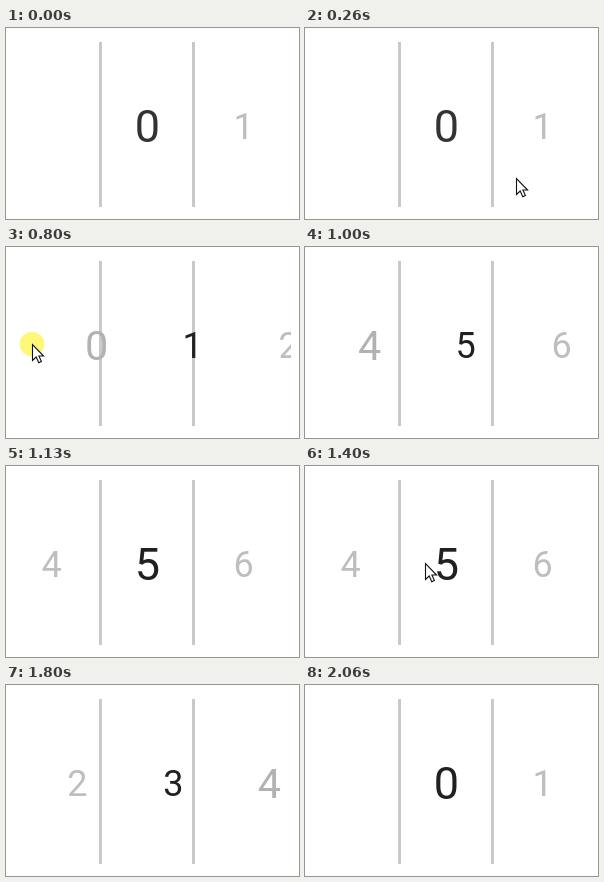
Recreate the animation shown at these times as an HTML page. Size 293x191 px, loop 2790 ms.

```html
<!DOCTYPE html>
<html lang="en">
<head>
<meta charset="utf-8">
<title>Number picker</title>
<style>
  html, body { margin: 0; width: 100%; height: 100%; overflow: hidden; background: #fff; }
  svg { display: block; width: 293px; height: 191px; }
  text { font-family: Roboto, Arial, sans-serif; text-anchor: middle; }
</style>
</head>
<body>
<svg viewBox="0 0 293 191">
  <defs><clipPath id="view"><rect width="285" height="191"/></clipPath></defs>
  <path d="M93 14h3v165h-3zM186 14h3v165h-3z" fill="#c9c9c9"/>
  <g id="digits" clip-path="url(#view)"></g>
  <circle id="touch" r="12.3" fill="#fef877"/>
  <path id="cursor" d="M.5 .5V16.5L4.2 13L6.8 18.8L9.4 17.6L6.9 12H11.6Z"
        fill="#fff" stroke="#111" stroke-width="1.1"/>
</svg>
<script>
const LOOP = 2790, STEPS_PER_MS = 0.015;
const CENTER = 141.5, GAP = 96, MIDDLE = 98.3, SMALL = 36, LARGE = 45;
const byId = id => document.getElementById(id);
const touch = byId('touch'), cursor = byId('cursor');

const digits = Array.from({ length: 10 }, (_, n) => {
  const el = document.createElementNS('http://www.w3.org/2000/svg', 'text');
  el.textContent = n;
  return byId('digits').appendChild(el);
});

// Scroll position, in digits, for each step.
function scrollAt(step) {
  if (step < 10) return 0;
  if (step < 13) return [0.03, 0.2, 0.53][step - 10];
  if (step < 17) return 5 - 4.47 * Math.pow(1 - (step - 12) / 5, 3.4);
  if (step < 26) return 5;
  if (step < 31) return [4.95, 2.73, 1.06, 0.42, 0.08][step - 26];
  return 0;
}

const selectedAt = step => Math.round(scrollAt(step));

function cursorAt(step) {
  if (step >= 2 && step <= 9) {
    const u = (step - 1) / 8;
    return [211 - 33 * Math.pow(u, 13), 104 + 87 * Math.pow(1 - u, 1.37)];
  }
  if (step >= 10 && step <= 12) return [[165, 103], [105, 100], [26, 97]][step - 10];
  if (step >= 18 && step <= 25) {
    const u = (step - 18) / 7;
    return [89 + 96 * (1 - u) * (1 - u), 91 + 15 * u];
  }
  return step === 26 ? [93, 106] : null;
}

// How enlarged a digit is: the new selection grows while the last one shrinks.
function growth(n, step) {
  const selected = selectedAt(step);
  let age = 0;
  while (age < 3 && selectedAt(step - age - 1) === selected) age++;
  const previous = selected + (step < 20 ? -1 : 1);
  if (n === selected) return [0, 0.6, 1, 1][age];
  return n === previous ? [0.6, 0.25, 0, 0][age] : 0;
}

function drawDigit(el, n, step) {
  const x = CENTER + GAP * (n - scrollAt(step));
  const visible = x > -20 && x < 310;
  el.setAttribute('visibility', visible ? 'visible' : 'hidden');
  if (!visible) return;
  const grown = growth(n, step);
  const size = SMALL + (LARGE - SMALL) * grown;
  const gray = 190 - 20 * grown;
  const dark = step < 10 ? '#333' : '#202020';
  el.setAttribute('x', x);
  el.setAttribute('y', MIDDLE + 0.355 * size);
  el.setAttribute('font-size', size);
  el.setAttribute('fill', n === selectedAt(step) ? dark : `rgb(${gray},${gray},${gray})`);
}

function draw(now) {
  const step = Math.floor((now % LOOP + 7) * STEPS_PER_MS);
  digits.forEach((el, n) => drawDigit(el, n, step));

  const point = cursorAt(step);
  const pressed = (step >= 10 && step <= 12) || step === 26;
  cursor.setAttribute('visibility', point ? 'visible' : 'hidden');
  touch.setAttribute('visibility', pressed ? 'visible' : 'hidden');
  if (point) {
    const place = `translate(${Math.round(point[0])} ${Math.round(point[1])})`;
    cursor.setAttribute('transform', place);
    touch.setAttribute('transform', place);
  }
}

const start = performance.now();
function tick() {
  draw(performance.now() - start);
  requestAnimationFrame(tick);
}
tick();
</script>
</body>
</html>
```
